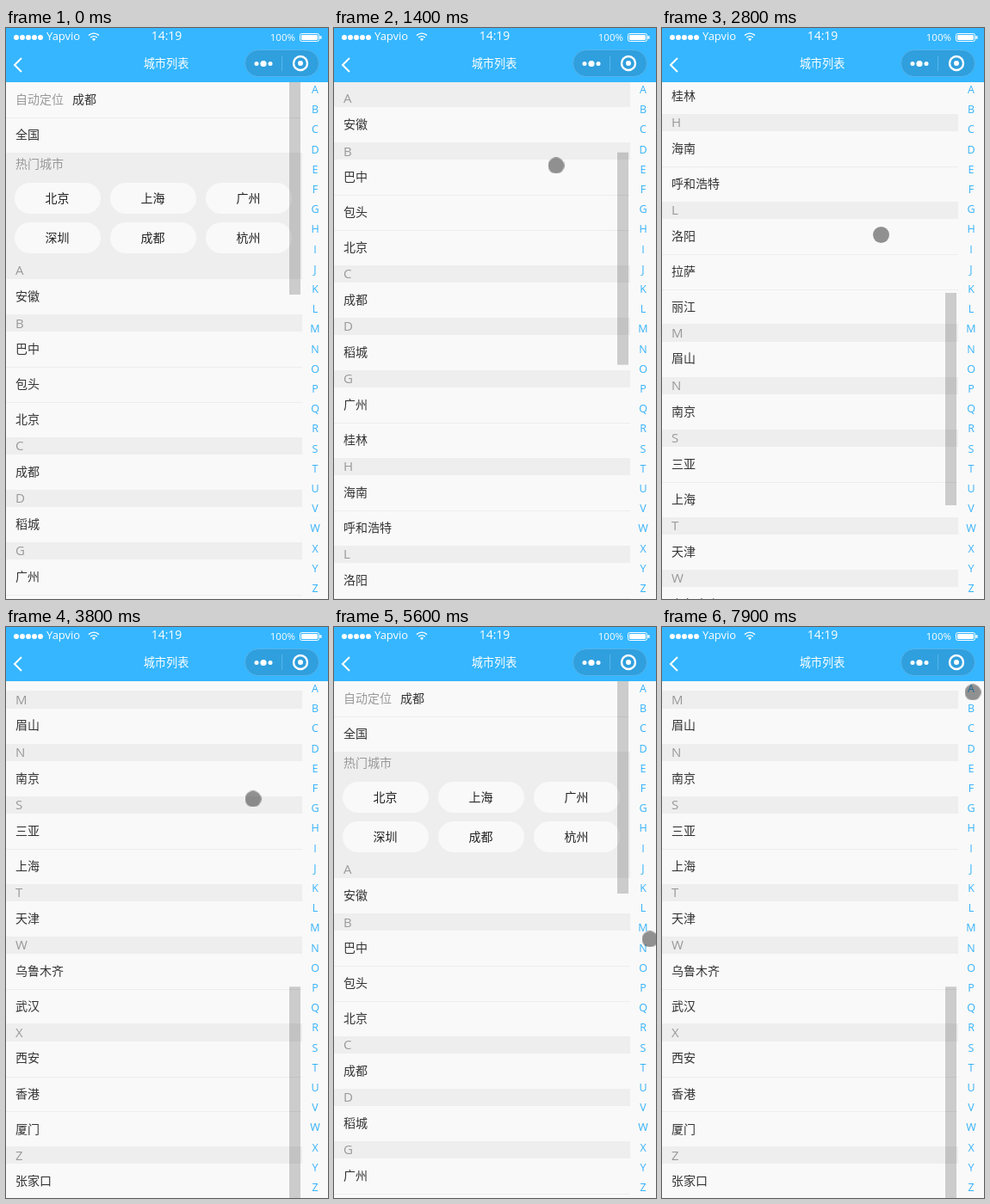
Recreate the animation shown at these times as an HTML page. Size 374x664 px, loop 8000 ms.

```html
<!DOCTYPE html>
<html lang="zh-CN">
<head>
<meta charset="utf-8">
<title>城市列表</title>
<style>
@property --s { syntax: "<number>"; inherits: true; initial-value: 0; }

html, body { margin: 0; width: 100%; height: 100%; overflow: hidden; }
body {
  position: relative; background: #f9f9f9; color: #333;
  font: 14px/20px "Open Sans", "Noto Sans CJK SC", "Noto Sans CJK", sans-serif;
}
header { position: absolute; inset: 0 auto auto 0; width: 374px; height: 63px; background: #35b6ff; }
header svg { display: block; }
header text { fill: #fff; }

.view {
  position: absolute; left: 0; top: 63px; width: 344px; height: 601px; overflow: hidden;
  animation: scroll 8s infinite;
}
.list { transform: translateY(calc(var(--s) * -1px)); }
.row, .head { box-sizing: border-box; padding: 0 0 1.4px 11px; display: flex; align-items: center; }
.row { height: 40.8px; }
.row + .row { border-top: 1px solid #ededed; }
.row span { color: #999; margin-right: 10px; }
.head { height: 20.3px; background: #eee; color: #999; font-size: 15px; }
.hot { position: relative; height: 127.4px; background: #eee; color: #999; }
.hot p { position: absolute; margin: 0; left: 11px; top: 3px; }
.hot b {
  position: absolute; width: 100px; height: 36px; border-radius: 18px;
  background: #f9f9f9; color: #222; font-weight: 400; line-height: 35px; text-align: center;
}
.thumb {
  position: absolute; left: 329px; top: 0; width: 13px; height: 246.5px;
  background: rgba(0, 0, 0, .18); transform: translateY(calc(var(--s) * .4083px));
}
.index i {
  position: absolute; left: 344px; width: 30px; text-align: center;
  font-style: normal; font-size: 12.5px; color: #35b2fa;
}
.cursor {
  position: absolute; left: -9.5px; top: -9.5px; width: 19px; height: 19px;
  border-radius: 50%; background: rgba(0, 0, 0, .42);
  animation: point 8s infinite;
}

/* Motion advances in 100 ms ticks (1.25% each). */
@keyframes scroll {
  0%     { --s: 0; animation-timing-function: steps(1); }
  12.5%  { --s: 0; animation-timing-function: steps(4); }
  17.5%  { --s: 200; animation-timing-function: steps(3); }
  21.25% { --s: 300; animation-timing-function: steps(3); }
  25%    { --s: 400; animation-timing-function: steps(2); }
  27.5%  { --s: 440; animation-timing-function: steps(2); }
  30%    { --s: 500; animation-timing-function: steps(1); }
  32.5%  { --s: 500; animation-timing-function: steps(4); }
  37.5%  { --s: 700; animation-timing-function: steps(1); }
  38.75% { --s: 700; animation-timing-function: steps(4); }
  43.75% { --s: 835; animation-timing-function: steps(1); }
  45%    { --s: 870; animation-timing-function: steps(1); }
  52.5%  { --s: 850; animation-timing-function: steps(1); }
  53.75% { --s: 640; animation-timing-function: steps(1); }
  55%    { --s: 370; animation-timing-function: steps(1); }
  56.25% { --s: 80; animation-timing-function: steps(1); }
  57.5%  { --s: 0; animation-timing-function: steps(1); }
  78.75% { --s: 15; animation-timing-function: steps(1); }
  80%    { --s: 330; animation-timing-function: steps(1); }
  81.25% { --s: 790; animation-timing-function: steps(1); }
  82.5%, 100% { --s: 870; }
}
@keyframes point {
  0%     { opacity: 0; transform: translate(283.5px, 80.5px); animation-timing-function: steps(1); }
  1.25%  { opacity: 1; transform: translate(283.5px, 80.5px); animation-timing-function: steps(8); }
  11.25% { transform: translate(244px, 139.5px); animation-timing-function: steps(5); }
  17.5%  { transform: translate(257.5px, 159.5px); animation-timing-function: steps(3); }
  21.25% { transform: translate(257.5px, 187px); animation-timing-function: steps(5); }
  27.5%  { transform: translate(250.5px, 231.5px); animation-timing-function: steps(2); }
  30%    { transform: translate(254px, 240px); animation-timing-function: steps(1); }
  38.75% { transform: translate(254px, 240px); animation-timing-function: steps(7); }
  47.5%  { transform: translate(286.5px, 199.5px); animation-timing-function: steps(2); }
  50%    { transform: translate(284px, 190px); animation-timing-function: steps(1); }
  51.25% { transform: translate(284px, 190px); animation-timing-function: steps(5); }
  57.5%  { transform: translate(277.5px, 110.5px); animation-timing-function: steps(1); }
  58.75% { transform: translate(277.5px, 110.5px); animation-timing-function: steps(7); }
  67.5%  { transform: translate(362px, 375.5px); animation-timing-function: steps(2); }
  70%    { transform: translate(366.5px, 362.5px); animation-timing-function: steps(1); }
  71.25% { transform: translate(366.5px, 362.5px); animation-timing-function: steps(3); }
  75%    { transform: translate(363.5px, 353.5px); animation-timing-function: steps(1); }
  87.5%  { transform: translate(363.5px, 347.5px); animation-timing-function: steps(4); }
  92.5%  { transform: translate(358.5px, 205px); animation-timing-function: steps(4); }
  97.5%  { transform: translate(360.5px, 76.5px); animation-timing-function: steps(1); }
  98.75%, 100% { opacity: 1; transform: translate(360.5px, 75.5px); }
}
</style>
</head>
<body>
<header>
  <svg width="374" height="63" fill="#fff">
    <path d="M12 11h28.5" fill="none" stroke="#fff" stroke-width="6" stroke-linecap="round" stroke-dasharray="0 7"/>
    <text x="47" y="14" font-size="13">Yapvio</text>
    <g fill="none" stroke="#fff" stroke-width="1.4">
      <path d="M96 8.6q6-5 12 0M98.2 11.1q3.8-3 7.6 0"/>
    </g>
    <path d="M99.9 12.8q2.1-1.5 4.2 0l-2.1 2.4z"/>
    <text x="186.5" y="14" font-size="14" text-anchor="middle">14:19</text>
    <text x="336" y="15" font-size="11.5" text-anchor="end">100%</text>
    <rect x="341.5" y="6.5" width="22" height="9" rx="2" fill="none" stroke="#fff"/>
    <rect x="343" y="8" width="19" height="6" rx="1"/>
    <rect x="364.5" y="9" width="2" height="4" rx="1"/>
    <path d="M18 35l-8 8 8 8" fill="none" stroke="#fff" stroke-width="2"/>
    <text x="186" y="46" font-size="13.2" font-weight="500" text-anchor="middle">城市列表</text>
    <rect x="277.5" y="25.5" width="86" height="31" rx="15.5" fill="#2f9fde" stroke="#55b4ea"/>
    <circle cx="291" cy="41.5" r="2.5"/>
    <circle cx="299" cy="41.5" r="3.6"/>
    <circle cx="307" cy="41.5" r="2.5"/>
    <path d="M320.5 32v18" stroke="#57b5e9"/>
    <circle cx="342" cy="41" r="8" fill="none" stroke="#fff" stroke-width="2.4"/>
    <circle cx="342" cy="41" r="3"/>
  </svg>
</header>
<div class="view">
  <div class="list"></div>
  <div class="thumb"></div>
</div>
<div class="index"></div>
<div class="cursor"></div>
<script>
const groups = 'A 安徽,B 巴中 包头 北京,C 成都,D 稻城,G 广州 桂林,H 海南 呼和浩特,L 洛阳 拉萨 丽江,M 眉山,' +
  'N 南京,S 三亚 上海,T 天津,W 乌鲁木齐 武汉,X 西安 香港 厦门,Z 张家口';
const hot = '北京 上海 广州 深圳 成都 杭州'.split(' ');
const row = text => `<div class="row">${text}</div>`;

const pills = hot.map((city, i) =>
  `<b style="left:${9.5 + i % 3 * 111}px;top:${35.5 + (i / 3 | 0) * 46}px">${city}</b>`).join('');

const sections = groups.split(',').map(group => {
  const [letter, ...cities] = group.split(' ');
  return `<div class="head">${letter}</div>` + cities.map(row).join('');
}).join('');

document.querySelector('.list').innerHTML =
  row('<span>自动定位</span>成都') + row('全国') +
  `<div class="hot"><p>热门城市</p>${pills}</div>` + sections;

document.querySelector('.index').innerHTML = [...'ABCDEFGHIJKLMNOPQRSTUVWXYZ'].map((letter, i) =>
  `<i style="top:${62 + i * 23.2}px">${letter}</i>`).join('');
</script>
</body>
</html>
```
